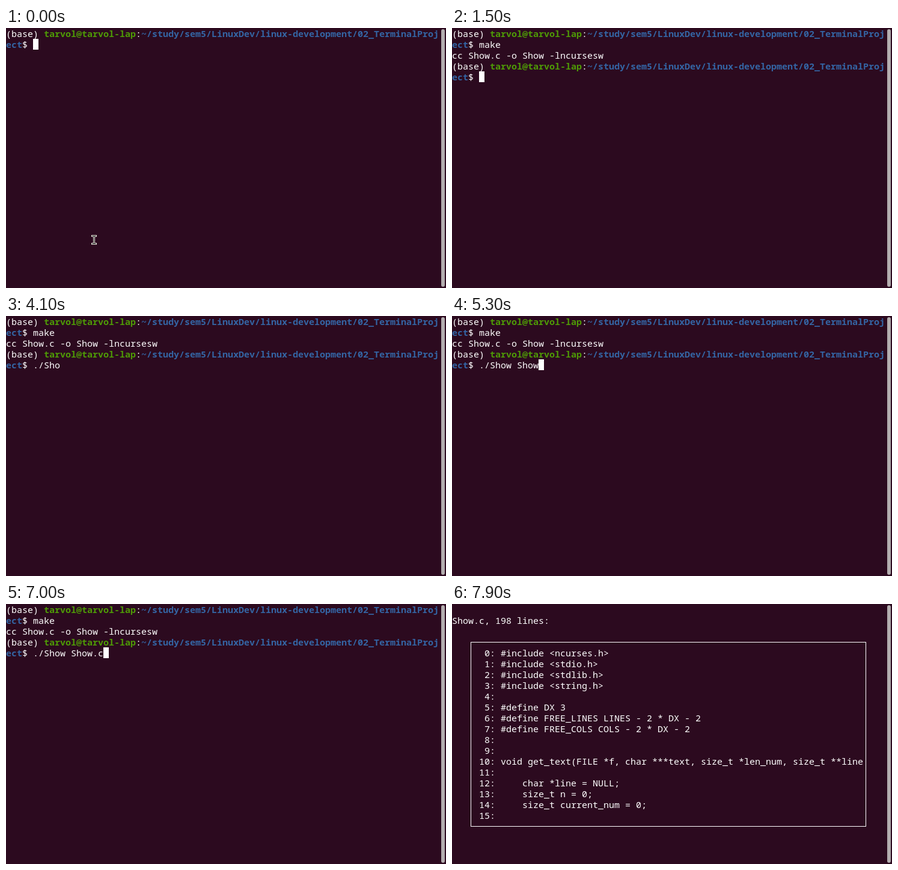
Write an HTML page with a canvas that moves like this. It is 732 px wide and 432 px high and loops after 8000 ms.

```html
<!DOCTYPE html>
<html lang="en">
<head>
<meta charset="utf-8">
<title>Terminal</title>
<style>
  html, body { margin: 0; width: 732px; height: 432px; overflow: hidden; background: #2c0a1f; }
  canvas { display: block; }
</style>
</head>
<body>
<canvas id="term" width="732" height="432"></canvas>
<script>
const ctx = document.getElementById('term').getContext('2d');
const LOOP = 8000, CW = 9, CH = 18, BASE = 15;
const BG = '#2c0a1f', WHITE = '#ffffff', GREEN = '#4e9a06', BLUE = '#3465a4', BAR = '#b3adaf';
const FONT = '15px "Noto Sans Mono", "DejaVu Sans Mono", monospace';

// [start ms, typed text, cursor visible]
const MAKE = [
  [0, '', true], [500, 'm', true], [800, 'mak', true], [900, 'make', true]
];
const RUN = [
  [1500, '', true], [2000, '', false],
  [2300, '.', true], [2400, './', true],
  [3400, './S', true], [3500, './Sho', true],
  [4100, './Sho', false], [4200, './Sho', true],
  [4400, './Show ', true],
  [4800, './Show S', true], [4900, './Show Sh', true],
  [5100, './Show Sho', true], [5300, './Show Show', true],
  [5900, './Show Show', false], [6000, './Show Show', true],
  [6500, './Show Show', false], [6600, './Show Show.', true],
  [6800, './Show Show.', false], [7000, './Show Show.c', true]
];
const POINTER_END = 400, RUN_START = 1500, VIEW_START = 7500, VIEW_BLINK = 7900;

const CODE = [
  '#include <ncurses.h>',
  '#include <stdio.h>',
  '#include <stdlib.h>',
  '#include <string.h>',
  '',
  '#define DX 3',
  '#define FREE_LINES LINES - 2 * DX - 2',
  '#define FREE_COLS COLS - 2 * DX - 2',
  '',
  '',
  'void get_text(FILE *f, char ***text, size_t *len_num, size_t **line',
  '',
  '    char *line = NULL;',
  '    size_t n = 0;',
  '    size_t current_num = 0;',
  ''
];

function rect(x, y, w, h, color) {
  ctx.fillStyle = color;
  ctx.fillRect(x, y, w, h);
}

function text(str, col, row, color = WHITE, bold = false) {
  ctx.font = (bold ? 'bold ' : '') + FONT;
  ctx.fillStyle = color;
  ctx.fillText(str, col * CW, row * CH + BASE);
}

function cursor(col, row) {
  rect(col * CW, row * CH, CW, CH, WHITE);
}

function prompt(row) {
  text('(base)', 0, row);
  text('tarvol@tarvol-lap', 7, row, GREEN, true);
  text(':', 24, row);
  text('~/study/sem5/LinuxDev/linux-development/02_TerminalProj', 25, row, BLUE, true);
  text('ect', 0, row + 1, BLUE, true);
  text('$', 3, row + 1);
}

function typing(steps, t, row) {
  const [, str, on] = steps.filter(s => s[0] <= t).pop();
  text(str, 5, row);
  if (on) cursor(5 + str.length, row);
}

function pointer() {
  const parts = [[143, 345, 7, 1], [146, 345, 1, 14], [143, 358, 7, 1]];
  for (const [x, y, w, h] of parts) rect(x - 1, y - 1, w + 2, h + 2, '#f4f1e6');
  for (const [x, y, w, h] of parts) rect(x, y, w, h, '#000000');
}

function scrollbar() {
  ctx.fillStyle = BAR;
  ctx.beginPath();
  ctx.roundRect(724, 2, 6, 428, 3);
  ctx.fill();
}

function shell(t) {
  prompt(0);
  if (t < RUN_START) {
    typing(MAKE, t, 1);
    if (t < POINTER_END) pointer();
    return;
  }
  text('make', 5, 1);
  text('cc Show.c -o Show -lncursesw', 0, 2);
  prompt(3);
  typing(RUN, t, 4);
}

function viewer(t) {
  text('Show.c, 198 lines:', 0, 1);
  ctx.strokeStyle = WHITE;
  ctx.lineWidth = 1;
  ctx.strokeRect(31.5, 63.5, 657, 306);
  CODE.forEach((line, i) => {
    text(String(i).padStart(2) + ':', 5, 4 + i);
    text(line, 9, 4 + i);
  });
  if (t < VIEW_BLINK) {
    cursor(6, 4);
    text('0', 6, 4, BG);
  }
}

const start = performance.now();

function draw() {
  const t = Math.max(0, performance.now() - start) % LOOP;
  rect(0, 0, 732, 432, BG);
  if (t < VIEW_START) shell(t);
  else viewer(t);
  scrollbar();
  requestAnimationFrame(draw);
}
draw();
</script>
</body>
</html>
```
